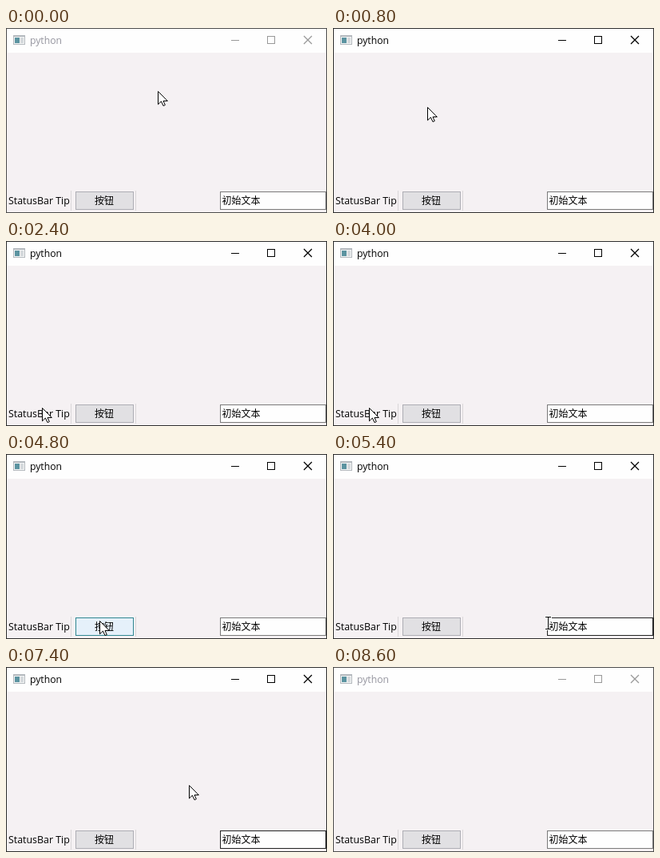
An HTML page for the animation above (8800 ms loop, 402 px wide and 232 px high).

```html
<!DOCTYPE html>
<html lang="zh-CN">
<head>
<meta charset="utf-8">
<title>python</title>
<style>
  html, body { margin: 0; width: 100%; height: 100%; overflow: hidden; background: #f5f1f3; }
  svg { display: block; width: 402px; height: 232px; }
  text { font: 12.4px "Open Sans", "Noto Sans CJK SC", "Noto Sans CJK", sans-serif; fill: #000; }
  .zh { font: 12px "Noto Sans CJK SC", "Noto Sans CJK", sans-serif; }
  .line { fill: none; stroke: #000; }
  #frame { fill: none; stroke: #2e2e2e; }
  #button { fill: #e1e0e3; stroke: #adadb4; }
  #button.hover { fill: #e5f0fa; stroke: #2f8792; }
  #edit { fill: #fefefe; stroke: #7a7a7a; }
  #edit.active { stroke: #222; }
  .inactive #frame { stroke: #4c4c4c; }
  .inactive #title { fill: #95959f; }
  .inactive .line { stroke: #999; }
</style>
</head>
<body>
<svg id="win" viewBox="0 0 402 232">
  <rect width="402" height="232" fill="#f5f1f3"/>
  <rect width="402" height="31" fill="#fefefe"/>

  <g shape-rendering="crispEdges">
    <rect x="9" y="9" width="15" height="12" fill="#b3b8bd"/>
    <rect x="10" y="11" width="13" height="9" fill="#f4f6f6"/>
    <rect x="11" y="12" width="6" height="7" fill="#5b93a0"/>
    <rect x="18" y="12" width="4" height="7" fill="#d5d9dc"/>
  </g>
  <text id="title" x="30" y="20" style="font-size:12.2px">python</text>
  <path class="line" d="M282 15.5H292M327.5 10.5h9v9h-9z" shape-rendering="crispEdges"/>
  <path class="line" d="M373 10l10 10m0-10l-10 10" stroke-width="1.3"/>

  <text x="3" y="221">StatusBar Tip</text>
  <path d="M81.5 204V229M162.5 204V229" stroke="#d9d6d8"/>
  <rect id="button" x="87.5" y="205.5" width="72" height="22"/>
  <text class="zh" x="111" y="221">按钮</text>
  <rect id="edit" x="268.5" y="205.5" width="132" height="22"/>
  <text class="zh" x="270.5" y="221">初始文本</text>

  <rect id="frame" x=".5" y=".5" width="401" height="231"/>

  <path id="arrow" d="M.5.5V16.8L4.4 13L7 18.6L9.3 17.6L7 12.5H12.3Z" fill="#fff" stroke="#000"/>
  <g id="beam" fill="none">
    <path d="M-4-7.5H5M.5-7.5V7.5M-4 7.5H5" stroke="#fff" stroke-width="3"/>
    <path d="M-3-7.5H4M.5-7.5V7.5M-3 7.5H4" stroke="#000"/>
  </g>
</svg>
<script>
const LOOP = 8800, STEP = 200, FOCUS_IN = 600, FOCUS_OUT = 8400;

// time, x, y of the pointer
const path = [
  [0, 190, 79], [200, 190, 79], [800, 118, 99], [1600, 118, 99],
  [2400, 45, 209], [4000, 45, 209], [4400, 117, 209], [5000, 117, 209],
  [5600, 322, 213], [6800, 322, 213], [7400, 229, 148], [7600, 240, 150],
  [8000, 240, 150], [8400, 420, 120], [LOOP, 420, 120]
];

const [win, button, edit, arrow, beam] =
  ["win", "button", "edit", "arrow", "beam"].map(id => document.getElementById(id));

function pointerAt(t) {
  const i = path.findIndex(p => p[0] > t);
  const [t0, x0, y0] = path[i - 1], [t1, x1, y1] = path[i];
  const u = (t - t0) / (t1 - t0), k = u * u * (3 - 2 * u);
  return [Math.round(x0 + (x1 - x0) * k), Math.round(y0 + (y1 - y0) * k)];
}

const inside = (x, y, left, right) => x >= left && x < right && y >= 205 && y < 228;

function place(el, x, y, shown) {
  el.setAttribute("transform", `translate(${x} ${y})`);
  el.setAttribute("visibility", shown ? "visible" : "hidden");
}

function draw(t) {
  const [x, y] = pointerAt(t);
  const overEdit = inside(x, y, 268, 401);
  win.classList.toggle("inactive", t < FOCUS_IN || t >= FOCUS_OUT);
  button.classList.toggle("hover", inside(x, y, 87, 160));
  edit.classList.toggle("active", t >= 5400 && t < FOCUS_OUT);
  place(arrow, x, y, !overEdit);
  place(beam, x, y, overEdit);
}

const start = performance.now();
let last = -1;
function tick() {
  const t = Math.floor((performance.now() - start) % LOOP / STEP) * STEP;
  if (t !== last) draw(last = t);
  requestAnimationFrame(tick);
}
tick();
</script>
</body>
</html>
```
